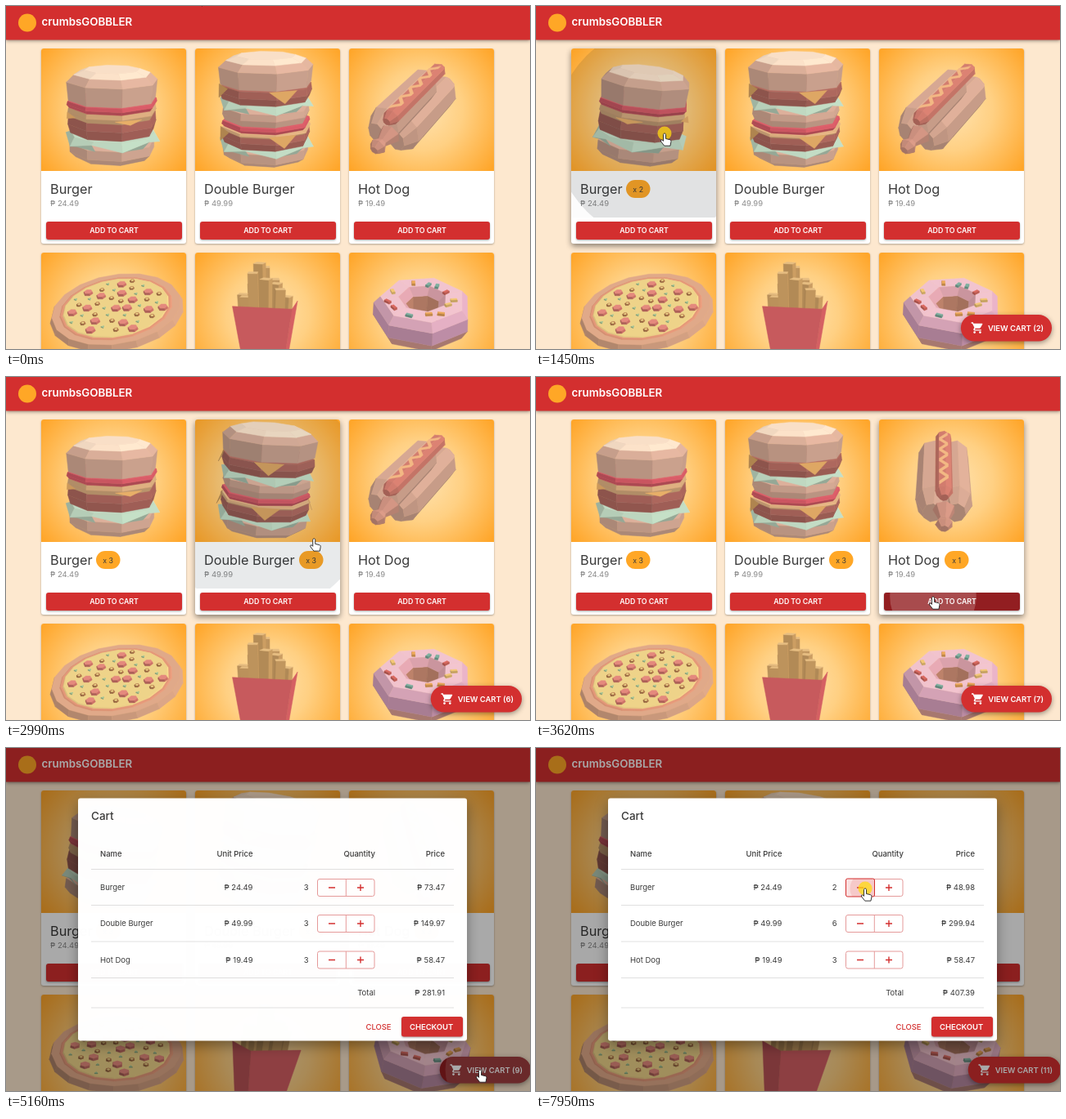
These frames come from a looping animation (640 px wide and 420 px high, 8 s). An HTML page:

```html
<!DOCTYPE html>
<html lang="en">
<head>
<meta charset="utf-8">
<title>Food cart</title>
<style>
html, body { margin: 0; width: 640px; height: 420px; overflow: hidden; background: #fde8cf; }
svg { display: block; font-family: Inter, Roboto, sans-serif; font-size: 9.48px; fill: #3a3a3a; }
.brand { font-size: 13.3px; font-weight: 600; fill: #fff; }
.name { font-size: 16.25px; }
.price { fill: #8b8b8b; }
.paper { fill: #fff; }
.btn { fill: #d32f2f; filter: drop-shadow(0 1px 1px rgba(0,0,0,.35)); }
.label { fill: #fff; font-weight: 600; letter-spacing: -.005em; }
.small { font-size: 8.8px; text-anchor: middle; }
.badge { font-size: 8.8px; text-anchor: middle; }
.head { font-weight: 500; }
.end { text-anchor: end; }
.title { font-size: 13.5px; font-weight: 500; }
.rule { stroke: #e0e0e0; }
.sign { stroke: #d32f2f; stroke-width: 1.4; fill: none; }
.sheet { fill: #fff; filter: drop-shadow(0 6px 8px rgba(0,0,0,.35)); }
.fab { filter: drop-shadow(0 2px 3px rgba(0,0,0,.4)); }
</style>
</head>
<body>
<svg id="stage" width="640" height="420" viewBox="0 0 640 420"></svg>
<script>
const LOOP = 8000, RED = '#d32f2f', DARK = '#921e21';
const $ = id => document.getElementById(id);
const clamp = v => Math.max(0, Math.min(1, v));
const money = v => '₱ ' + v.toFixed(2);

// Standard material curve: cubic-bezier(.4, 0, .2, 1)
function ease(x) {
  x = clamp(x);
  let lo = 0, hi = 1, s = .5;
  for (let i = 0; i < 18; i++) {
    s = (lo + hi) / 2;
    const u = 1 - s;
    if (1.2 * u * u * s + .6 * u * s * s + s ** 3 < x) lo = s; else hi = s;
  }
  return 3 * (1 - s) * s * s + s ** 3;
}

// ---- Low-poly models: a model is an ordered list of parts, a part a list of faces ----
const BUN = [216, 172, 151], CREAM = [243, 218, 194], TOMATO = [218, 92, 104], CHEESE = [224, 178, 130],
  PATTY = [178, 106, 96], LEAF = [188, 213, 190], FRY = [214, 166, 104], BOX = [236, 106, 110];

function lathe(rings, n, color, { phase = .2, cap = color, wave = 0 } = {}) {
  const pt = ([y, r], i, k) => {
    const a = phase + i * 2 * Math.PI / n;
    const w = wave && k === 1 ? (i % 2 ? wave : -wave) : 0;
    return [r * Math.sin(a), y + w, r * Math.cos(a)];
  };
  const loops = rings.map((g, k) => Array.from({ length: n }, (_, i) => pt(g, i, k)));
  const ref = [0, (rings[0][0] + rings.at(-1)[0]) / 2, 0];
  const faces = [];
  for (let k = 0; k + 1 < loops.length; k++)
    for (let i = 0; i < n; i++) {
      const j = (i + 1) % n;
      faces.push({ p: [loops[k][i], loops[k][j], loops[k + 1][j], loops[k + 1][i]], color, ref });
    }
  if (cap) faces.push({ p: loops[0], color, ref }, { p: loops.at(-1), color: cap, ref });
  return faces;
}
const place = (part, f) => part.map(q => ({ ...q, p: q.p.map(f), ref: f(q.ref) }));

const slab = (y0, y1, r, color) => lathe([[y0, r - 3], [(y0 + y1) / 2, r], [y1, r - 1]], 8, color);
const leaf = (y0, y1, r) => lathe([[y0, r - 6], [(y0 + y1) / 2, r + 3], [y1, r - 3]], 10, LEAF, { wave: 4 });
const topBun = (y, h, r) => [
  lathe([[y, r - 2], [y + h * .62, r], [y + h * .86, r - 9]], 8, BUN),
  lathe([[y + h * .86, r - 9], [y + h, r - 22]], 8, CREAM)
];
function flaps(y, r, drop) {
  return [0, 1, 2, 3].map(i => {
    const at = (a, rr, yy) => [rr * Math.sin(a), yy, rr * Math.cos(a)], a = .36 + i * Math.PI / 2;
    return { p: [at(a - .3, r, y), at(a + .3, r, y), at(a, r + 3, y - drop)], color: [218, 164, 98], ref: [0, y - 4, 0] };
  });
}

const burger = [
  lathe([[-50, 46], [-43, 53], [-32, 53]], 8, BUN),
  leaf(-33, -21, 55), slab(-19, 3, 55, PATTY), slab(1, 12, 55, CHEESE), flaps(5, 55, 4),
  slab(12, 20, 56, TOMATO), ...topBun(21, 36, 56)
];
const doubleBurger = [
  lathe([[-59, 46], [-54, 53], [-43, 54]], 8, BUN),
  leaf(-46, -36, 55), slab(-38, -22, 55, PATTY), slab(-23, -19, 56, CHEESE), flaps(-20, 56, 13),
  slab(-18, -11, 55, TOMATO), slab(-10, 5, 54, BUN), leaf(5, 15, 54),
  slab(16, 32, 57, PATTY), flaps(33, 57, 13), ...topBun(34, 33, 58)
];

function hotDogModel() {
  const half = lathe([[-62, 14], [-50, 25], [44, 27], [62, 15]], 8, [212, 166, 145]);
  const along = (dx, dy, sx) => ([x, y, z]) => [x * sx + dx, z * .95 + dy, y];
  const knob = lathe([[54, 13], [72, 6], [80, 10], [87, 5]], 7, [206, 146, 128]);
  const meat = lathe([[-68, 5], [-60, 10], [50, 10], [60, 5]], 8, [206, 122, 108]);
  const sauce = Array.from({ length: 9 }, (_, i) => {
    const z = -54 + i * 11, s = i % 2 ? 5 : -5;
    return { p: [[-s, 29, z - 3], [-s, 29, z + 3], [s, 29, z + 14], [s, 29, z + 8]], color: [232, 176, 126], ref: [0, 0, z] };
  });
  return [place(half, along(14, -2, .72)), place(half, along(-14, -2, .72)), place(knob, along(0, -4, 1)),
    place(meat, along(0, 19, 1)), sauce];
}

function pizzaModel() {
  const parts = [
    lathe([[-8, 68], [0, 82], [7, 79]], 18, [218, 165, 134]),
    lathe([[7, 69], [7.5, 68]], 18, [222, 148, 118]),
    lathe([[7.5, 65], [8, 64]], 18, [232, 206, 134])
  ];
  const put = (part, r, a) => parts.push(place(part, ([x, y, z]) => [x + r * Math.sin(a), y, z + r * Math.cos(a)]));
  for (let i = 0; i < 46; i++) {
    const r = 8.8 * Math.sqrt(i + .6), a = i * 2.39996;
    if (i % 3 === 0) put(lathe([[8, 6], [10.5, 5.5]], 6, [212, 116, 108], { cap: [222, 134, 122] }), r, a);
    else if (i % 3 === 1) {
      put(lathe([[8, 3.2], [9.5, 2.8]], 6, [176, 118, 76]), r, a);
      put(lathe([[9.5, 1.4], [9.6, 1.3]], 6, [232, 206, 134]), r, a);
    } else put(lathe([[8, 2.2], [9, 2]], 3, [164, 196, 150]), r, a);
  }
  return parts;
}

function friesModel() {
  const fries = Array.from({ length: 11 }, (_, i) => {
    const x = -27 + 5 * i, z = 14 * Math.sin(i * 2.4);
    const top = 16 + 40 * Math.exp(-(((x + 3) / 17) ** 2)) + 7 * Math.sin(i * 5);
    const part = lathe([[-10, 8], [top, 8]], 4, FRY, { phase: Math.PI / 4 + .3 * Math.sin(i * 3), cap: [224, 184, 126] });
    return { z, part: place(part, p => [p[0] + x + p[1] * x * .002, p[1], p[2] + z]) };
  }).sort((a, b) => a.z - b.z).map(f => f.part);
  const box = lathe([[-75, 33], [11, 51]], 4, BOX, { phase: Math.PI / 4, cap: null });
  return [...fries, place(box, ([x, y, z]) => [x, y, z * .6])];
}

function donutModel() {
  const profile = [[54, -22], [61, -9], [60, 8], [52, 17], [30, 18], [21, 9], [20, -20]];
  const tones = [[212, 152, 140], [212, 158, 186], [224, 172, 192], [230, 186, 196], [220, 162, 172], [206, 142, 116]];
  const n = 7, ring = [];
  const at = ([r, y], i) => [r * Math.sin(i * 2 * Math.PI / n), y, r * Math.cos(i * 2 * Math.PI / n)];
  for (let i = 0; i < n; i++)
    tones.forEach((color, k) => ring.push({
      p: [at(profile[k], i), at(profile[k], i + 1), at(profile[k + 1], i + 1), at(profile[k + 1], i)],
      color, ref: at([40, -2], i + .5)
    }));
  const hues = [[226, 160, 84], [120, 168, 152], [208, 100, 90], [232, 190, 110]];
  const bits = Array.from({ length: 12 }, (_, i) => {
    const a = i * 2.39996, r = 37 + 7 * Math.sin(i * 4), c = Math.cos(i * 2), s = Math.sin(i * 2);
    const bit = lathe([[18, 2.8], [20.5, 2.6]], 4, hues[i % 4], { phase: Math.PI / 4 });
    return place(bit, ([x, y, z]) => [x * 2 * c - z * s + r * Math.sin(a), y, x * 2 * s + z * c + r * Math.cos(a)]);
  });
  return [ring, ...bits];
}

const sub = (a, b) => a.map((v, i) => v - b[i]);
const dot = (a, b) => a[0] * b[0] + a[1] * b[1] + a[2] * b[2];
const cross = (a, b) => [a[1] * b[2] - a[2] * b[1], a[2] * b[0] - a[0] * b[2], a[0] * b[1] - a[1] * b[0]];
const mean = ps => [0, 1, 2].map(i => ps.reduce((s, p) => s + p[i], 0) / ps.length);

function drawModel({ model, cx, cy, pitch }, yaw, roll) {
  const D = 800, light = [.45, .7, .55];
  const [cw, sw, cp, sp, cr, sr] = [yaw, pitch, roll].flatMap(a => [Math.cos(a), Math.sin(a)]);
  const turn = ([x, y, z]) => {
    const x1 = x * cw + z * sw, z1 = z * cw - x * sw, y1 = y * cp - z1 * sp;
    return [x1 * cr - y1 * sr, x1 * sr + y1 * cr, y * sp + z1 * cp];
  };
  let out = '';
  for (const part of model) {
    const seen = [];
    for (const face of part) {
      const p = face.p.map(turn), c = mean(p);
      let n = cross(sub(p[1], p[0]), sub(p[2], p[0]));
      const len = Math.hypot(...n) || 1, dir = dot(n, sub(c, turn(face.ref))) < 0 ? -1 : 1;
      n = n.map(v => v * dir / len);
      if (dot(n, sub([0, 0, D], c)) <= 0) continue;
      const glow = .79 + .29 * Math.max(0, dot(n, light));
      seen.push({ z: c[2], p, fill: `rgb(${face.color.map(v => Math.min(255, Math.round(v * glow)))})` });
    }
    seen.sort((a, b) => a.z - b.z);
    for (const { p, fill } of seen) {
      const pts = p.map(([x, y, z]) => {
        const k = D / (D - z);
        return (cx + x * k).toFixed(1) + ',' + (cy - y * k).toFixed(1);
      }).join(' ');
      out += `<polygon points="${pts}" fill="${fill}" stroke="${fill}" stroke-width=".5"/>`;
    }
  }
  return out;
}

// ---- Products and the script of the visit ----
const items = [
  { name: 'Burger', price: 24.49, badge: 110, hover: [520, 1740], lean: -.11, model: burger, cx: 87, cy: 82, pitch: .23, yaw: 0, roll: 0 },
  { name: 'Double Burger', price: 49.99, badge: 358, hover: [1750, 3060], lean: -.08, model: doubleBurger, cx: 87, cy: 75, pitch: .23, yaw: 0, roll: 0 },
  { name: 'Hot Dog', price: 19.49, badge: 499, hover: [3075, 4570], lean: 0, model: hotDogModel(), cx: 79, cy: 72, pitch: .66, yaw: -.54, roll: 0 },
  { model: pizzaModel(), cx: 92, cy: 72, pitch: .57, yaw: 0, roll: .17 },
  { model: friesModel(), cx: 86, cy: 73, pitch: .25, yaw: -.2, roll: 0 },
  { model: donutModel(), cx: 90, cy: 71, pitch: .58, yaw: .2, roll: -.04 }
];
items.forEach((it, i) => { it.x = 43 + 188 * (i % 3); it.y = i < 3 ? 52 : 302; });

const LAG = 80, OPEN = 4960;
const hosts = {
  c0: { x: 43, y: 52, r: 156, item: 0, add: 1, alpha: .11 },
  c1: { x: 231, y: 52, r: 148, item: 1, add: 1, alpha: .11 },
  b2: { x: 425, y: 264, r: 107, item: 2, add: 1, alpha: .2 },
  fab: { x: 518, y: 378, r: 64, alpha: .14 },
  plus: { x: 413, y: 204, r: 26, item: 1, add: 1, alpha: .12 },
  minus: { x: 378, y: 160, r: 26, item: 0, add: -1, alpha: .12 }
};
const clicks = [
  [880, 'c0'], [1130, 'c0'], [1430, 'c0'], [2120, 'c1'], [2300, 'c1'], [2600, 'c1'],
  [3430, 'b2'], [3770, 'b2'], [4100, 'b2'], [4850, 'fab'],
  [6230, 'plus'], [6520, 'plus'], [6800, 'plus'], [7700, 'minus'], [7930, 'minus']
];
const path = [
  [300, 234, -15], [800, 157, 156], [1560, 157, 156], [1950, 306, 152], [2760, 306, 152], [3300, 485, 269],
  [4480, 485, 269], [4800, 579, 394], [5390, 579, 394], [5850, 432, 214], [6990, 432, 214], [7600, 402, 172]
];
const arrowTimes = [[0, 520], [4575, 4690], [5450, 5770], [7060, 7500]];
const within = (t, [a, b]) => t >= a && t < b;

function cursorAt(t) {
  let i = path.findIndex(k => k[0] > t);
  if (i === 0) return path[0].slice(1);
  if (i < 0) return path.at(-1).slice(1);
  const [t0, x0, y0] = path[i - 1], [t1, x1, y1] = path[i];
  const u = (t - t0) / (t1 - t0), e = u * u * (3 - 2 * u);
  return [x0 + (x1 - x0) * e, y0 + (y1 - y0) * e];
}

function quantities(t) {
  const q = [0, 0, 0];
  for (const [at, id] of clicks) if (t >= at + LAG && hosts[id].add) q[hosts[id].item] += hosts[id].add;
  return q;
}

// ---- Static picture ----
const text = (x, y, s, cls = '') => `<text x="${x}" y="${y}" class="${cls}">${s}</text>`;
const clip = (id, w, h, r) => `<clipPath id="${id}"><rect width="${w}" height="${h}" rx="${r}"/></clipPath>`;

function card(it, i) {
  const info = it.name ? text(11, 177.5, it.name, 'name') + text(11, 193, money(it.price), 'price') +
    `<g id="badge${i}"><rect x="${it.badge - it.x}" y="161" width="29.5" height="22" rx="11" fill="#ffa726"/>
     <text id="num${i}" class="badge" x="${it.badge - it.x + 14.7}" y="175.5"></text></g>
     <g id="r-c${i}" clip-path="url(#action)"></g>
     <rect id="add${i}" class="btn" x="6" y="212" width="166" height="22" rx="3"/>
     <g transform="translate(6 212)" clip-path="url(#button)"><g id="r-b${i}"></g></g>` +
    text(89, 226.4, 'ADD TO CART', 'label small') : '';
  return `<g transform="translate(${it.x} ${it.y})"><rect id="paper${i}" class="paper" width="177" height="239" rx="3"/>
    <g clip-path="url(#photo)"><rect width="177" height="150" fill="url(#glow)"/><g id="food${i}"></g></g>${info}</g>`;
}

$('stage').innerHTML = `
<defs>
  <radialGradient id="glow" gradientUnits="userSpaceOnUse" cx="88.5" cy="75" r="112">
    <stop offset="0" stop-color="#ffe3b0"/><stop offset=".45" stop-color="#ffd083"/><stop offset="1" stop-color="#ffa62a"/>
  </radialGradient>
  <clipPath id="photo"><path d="M0 150V3Q0 0 3 0H174Q177 0 177 3V150Z"/></clipPath>
  ${clip('action', 177, 207, 2)}${clip('button', 166, 22, 3)}${clip('step', 35, 22, 2)}
  <clipPath id="pill"><rect id="pillBox" height="32.5" rx="16.2"/></clipPath>
</defs>
<rect width="640" height="420" fill="#fde8cf"/>
${items.map(card).join('')}
<rect width="640" height="41.5" fill="${RED}" style="filter:drop-shadow(0 1px 2px rgba(0,0,0,.45))"/>
<circle cx="26" cy="20.5" r="11" fill="#ffa726"/>
${text(43.5, 24.3, 'crumbsGOBBLER', 'brand')}
<g id="fab">
  <rect id="fabBox" class="fab" height="32.5" rx="16.2"/>
  <g clip-path="url(#pill)"><g id="r-fab"></g></g>
  <g transform="translate(12 8) scale(.677)" fill="#fff">
    <path d="M1 2v2h2l3.6 7.6-1.4 2.4c-.7 1.4.3 3 1.8 3h12v-2H7.4l1-2h7.5c.7 0 1.4-.4 1.7-1l3.6-6.5c.4-.7-.1-1.5-.9-1.5H5.2l-.9-2z"/>
    <circle cx="7" cy="20" r="2"/><circle cx="17" cy="20" r="2"/>
  </g>
  <text id="fabText" class="label" x="33" y="19.7"></text>
</g>
<g id="dialog">
  <rect width="640" height="420" fill="#000" opacity=".34"/>
  <rect class="sheet" x="88" y="61.5" width="475" height="297" rx="3"/>
  ${text(104, 88, 'Cart', 'title')}
  ${[148.5, 192.5, 237, 281.5, 318].map(y => `<path class="rule" d="M104 ${y}H547"/>`).join('')}
  <g id="table"></g>
  <g transform="translate(413 204)" clip-path="url(#step)"><g id="r-plus"></g></g>
  <g transform="translate(378 160)" clip-path="url(#step)"><g id="r-minus"></g></g>
  <text x="439.5" y="344.5" class="label" style="fill:${RED};font-weight:500">CLOSE</text>
  <rect class="btn" x="483" y="329" width="75" height="24.5" rx="3"/>
  ${text(493, 344.5, 'CHECKOUT', 'label')}
</g>
<g id="cursor">
  <circle id="press" r="8.5" fill="#ffd90f" opacity=".75"/>
  <path id="hand" fill="#fff" stroke="#222" stroke-width=".9" stroke-linejoin="round"
    d="M-1.5 1.5c0-2 3-2 3 0V6.5l5 1.2c1.3.4 1.6 1.3 1.4 2.6l-.9 4.9H-.3L-4.3 10c-1-1.6.6-2.8 1.9-1.6l.9 1z"/>
  <path id="arrow" fill="#fff" stroke="#222" stroke-width=".9" d="M0 0V13l3-2.8 2 4.9 2.2-.9-2-4.7h4.2z"/>
</g>`;

// ---- Moving picture ----
const cache = {};
function fill(id, key, make) {
  if (cache[id] === key) return;
  cache[id] = key;
  $(id).innerHTML = make();
}
const show = (id, on) => $(id).setAttribute('visibility', on ? 'visible' : 'hidden');

function stepper(y, hot) {
  const cell = (x, on) => on ? `<rect x="${x}" y="${y - 11}" width="35" height="22" rx="2" fill="#fadfdf" stroke="${RED}"/>` : '';
  return `<rect x="380.5" y="${y - 10.5}" width="69.5" height="21" rx="2.5" fill="none" stroke="#e59a9a"/>
    <path d="M415.3 ${y - 10.5}v21" stroke="#e59a9a"/>${cell(380.5, hot === 'minus')}${cell(415, hot === 'plus')}
    <path class="sign" d="M394 ${y}h8M429 ${y}h8M433 ${y - 4}v8"/>`;
}

function table(q, wide, hot) {
  const s = wide ? 2 : 0, u = wide ? 300.5 : 301.5;
  let total = 0;
  const rows = items.slice(0, 3).map((it, i) => {
    const y = [171, 215, 259.5][i], b = y + 3.3, sum = q[i] * it.price;
    total += sum;
    const mine = hot === 'plus' && i === 1 || hot === 'minus' && i === 0 ? hot : '';
    return text(115, b, it.name) + text(u, b, money(it.price), 'end') + text(369.5 - s, b, q[i], 'end') +
      `<g transform="translate(${-s} 0)">${stepper(y, mine)}</g>` + text(536, b, money(sum), 'end');
  }).join('');
  return text(115, 132.5, 'Name', 'head') + text(u, 132.5, 'Unit Price', 'head end') +
    text(451 - s, 132.5, 'Quantity', 'head end') + text(536, 132.5, 'Price', 'head end') + rows +
    text(451 - s, 302.8, 'Total', 'end') + text(536, 302.8, money(total), 'end');
}

function ripples(id, t) {
  const h = hosts[id];
  return clicks.filter(([at, host]) => host === id && within(t, [at, at + 600])).map(([at]) => {
    const age = t - at, [x, y] = cursorAt(at);
    const alpha = h.alpha * clamp(.4 + age / 150) * clamp((600 - age) / 250);
    const color = id[0] === 'c' ? '#0a1a20' : id === 'b2' || id === 'fab' ? '#fff' : RED;
    return `<circle cx="${x - h.x}" cy="${y - h.y}" r="${h.r * ease(age / 550)}" fill="${color}" opacity="${alpha}"/>`;
  }).join('');
}

function drawItem(it, i, t, q) {
  let yaw = it.yaw, roll = it.roll, lift = 0;
  if (it.hover) {
    const [a, b] = it.hover, held = Math.max(0, Math.min(t, b) - a), back = 1 - ease((t - b) / 300);
    yaw += held / 1000 * back;
    roll += it.lean * ease(held / 500) * back;
    lift = ease(held / 200) * back;
    show('badge' + i, q[i] > 0);
    $('num' + i).textContent = 'x ' + q[i];
  }
  if (t >= OPEN + 120) { yaw += .8; roll -= .15; }
  fill('food' + i, yaw.toFixed(3) + roll.toFixed(3), () => drawModel(it, yaw, roll));
  $('paper' + i).style.filter = `drop-shadow(0 ${1 + 2 * lift}px ${1.2 + 2.5 * lift}px rgba(0,0,0,${.3 + .15 * lift}))`;
}

function frame(now) {
  const t = now % LOOP, q = quantities(t), count = q[0] + q[1] + q[2];
  items.forEach((it, i) => drawItem(it, i, t, q));
  $('add2').style.fill = within(t, [3220, 4510]) ? DARK : RED;

  $('fabText').textContent = `VIEW CART (${count})`;
  const w = 43 + $('fabText').getComputedTextLength(), right = t < OPEN ? 630 : 641;
  const zoom = ease((t - clicks[0][0] - LAG) / 225);
  show('fab', zoom > 0);
  $('fab').setAttribute('transform', `translate(${right - w / 2} 394.2) scale(${zoom}) translate(${-w / 2} -16.2)`);
  $('fabBox').setAttribute('width', w);
  $('pillBox').setAttribute('width', w);
  $('fabBox').style.fill = within(t, [4690, 5430]) ? DARK : RED;

  const fade = ease((t - OPEN) / 225);
  $('dialog').setAttribute('opacity', fade);
  show('dialog', fade > 0);
  const hot = within(t, [5770, 7060]) ? 'plus' : t >= 7500 ? 'minus' : '';
  fill('table', q + hot, () => table(q, q[1] > 3, hot));
  for (const id in hosts) { const r = ripples(id, t); fill('r-' + id, r, () => r); }

  const [x, y] = cursorAt(t), arrow = arrowTimes.some(span => within(t, span));
  $('cursor').setAttribute('transform', `translate(${x} ${y})`);
  show('arrow', arrow);
  show('hand', !arrow);
  show('press', clicks.some(([at]) => within(t, [at, at + 140])));
}

const start = performance.now();
function tick() {
  frame(performance.now() - start);
  requestAnimationFrame(tick);
}
tick();
</script>
</body>
</html>
```
